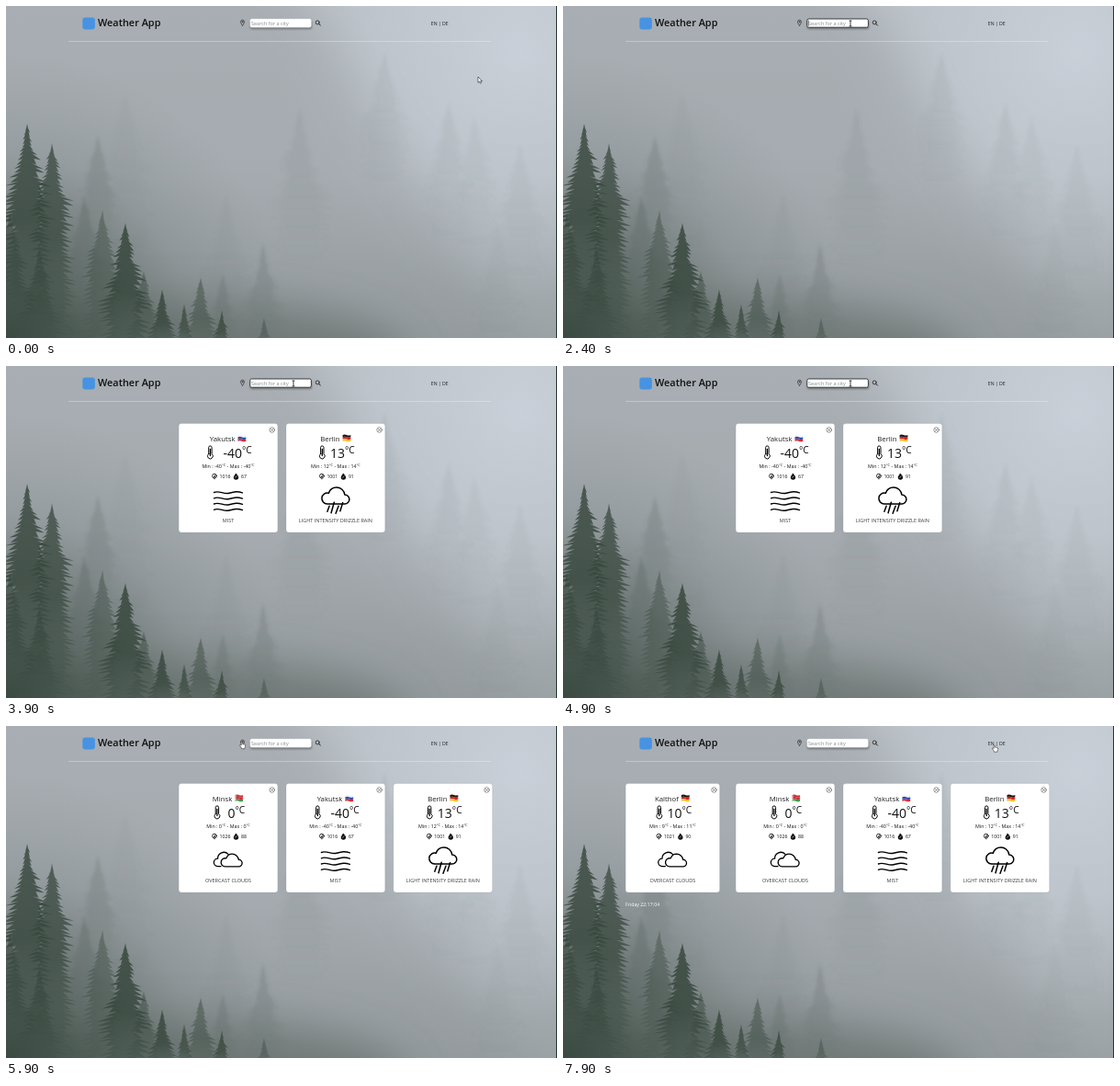
An HTML page for the animation above (8000 ms loop, 600 px wide and 361 px high).

```html
<!DOCTYPE html>
<html lang="en">
<head>
<meta charset="utf-8">
<title>Weather App</title>
<style>
  html, body { margin: 0; width: 100%; height: 100%; overflow: hidden; background: #a3a9ac; }
  svg { display: block; width: 600px; height: 361px; font-family: "Open Sans", "Noto Sans", sans-serif; }
  .line { fill: none; stroke: #000; stroke-linecap: round; stroke-linejoin: round; }
</style>
</head>
<body>
<svg id="stage" viewBox="0 0 600 361" xmlns="http://www.w3.org/2000/svg">
  <defs>
    <linearGradient id="sky" x2="0" y2="1">
      <stop offset="0" stop-color="#b9bfc5"/><stop offset=".5" stop-color="#b5bbc1"/>
      <stop offset="1" stop-color="#9ba2a5"/>
    </linearGradient>
    <radialGradient id="glow" gradientUnits="userSpaceOnUse" cx="560" cy="50" r="270">
      <stop offset="0" stop-color="#ccd3dc" stop-opacity=".85"/>
      <stop offset=".5" stop-color="#c6ced6" stop-opacity=".5"/>
      <stop offset="1" stop-color="#c4ccd4" stop-opacity="0"/>
    </radialGradient>
    <radialGradient id="dark" gradientUnits="userSpaceOnUse" cx="0" cy="361" r="310">
      <stop offset="0" stop-color="#33443a" stop-opacity=".92"/>
      <stop offset=".32" stop-color="#3b4b42" stop-opacity=".58"/>
      <stop offset=".65" stop-color="#56625d" stop-opacity=".2"/>
      <stop offset="1" stop-color="#6a7572" stop-opacity="0"/>
    </radialGradient>
    <linearGradient id="bark" x2="0" y2="1">
      <stop offset="0" stop-color="#34443a"/><stop offset=".5" stop-color="#37473d"/>
      <stop offset="1" stop-color="#42524a" stop-opacity=".3"/>
    </linearGradient>
    <linearGradient id="mistBark" x2="0" y2="1">
      <stop offset="0" stop-color="#5f6b68"/><stop offset=".4" stop-color="#5f6b68"/>
      <stop offset="1" stop-color="#5f6b68" stop-opacity="0"/>
    </linearGradient>
    <filter id="soft" x="-30%" y="-30%" width="160%" height="160%"><feGaussianBlur stdDeviation=".6"/></filter>
    <filter id="fog" x="-60%" y="-30%" width="220%" height="160%"><feGaussianBlur stdDeviation="1.8"/></filter>
    <filter id="haze" x="-30%" y="-60%" width="160%" height="220%"><feGaussianBlur stdDeviation="24"/></filter>
    <filter id="shade" x="-10%" y="-50%" width="120%" height="220%"><feGaussianBlur stdDeviation="1.3"/></filter>
  </defs>

  <rect width="600" height="361" fill="url(#sky)"/>
  <rect width="600" height="361" fill="url(#glow)"/>
  <path d="M260-80 350 20 400 120 470 220 580 420H-80V-80z" fill="#868b8e" opacity=".32" filter="url(#haze)"/>
  <ellipse cx="200" cy="390" rx="240" ry="70" fill="#4d5a53" opacity=".5" filter="url(#haze)"/>
  <rect width="600" height="361" fill="url(#dark)"/>
  <g id="far" filter="url(#fog)"></g>
  <g id="near" filter="url(#soft)"></g>
  <rect x="599" width="1" height="361" fill="#26352f"/>

  <rect x="83.3" y="12.4" width="13.6" height="13.2" rx="3" fill="#4793e2"/>
  <text x="100" y="22" font-size="10.9" font-weight="600" fill="#111">Weather App</text>
  <path d="M68 38.5H528" stroke="#fff" stroke-opacity=".38" stroke-width=".8"/>
  <g class="line" style="stroke:#333" stroke-width=".7">
    <path d="M257.5 21.2C256.2 19.4 255.5 18.2 255.5 17.2A2 2 0 0 1 259.5 17.2C259.5 18.2 258.8 19.4 257.5 21.2z"/>
    <circle cx="257.5" cy="17.2" r=".6"/>
    <circle cx="339.2" cy="17.9" r="2" style="stroke:#111"/><path d="M340.8 19.5 342.4 21.1" stroke-width="1" style="stroke:#111"/>
  </g>
  <rect x="266" y="16" width="67" height="9" rx="2" fill="#222" opacity=".45" filter="url(#shade)"/>
  <rect id="field" x="265.8" y="14" width="66.6" height="9.2" rx="1.8" fill="#fff"/>
  <text id="entry" x="267" y="20.6" font-size="5.5"></text>
  <path id="caret" d="M267.2 15.3V21.9" stroke="#111" stroke-width=".6"/>
  <text x="462.8" y="20.6" font-size="5.15" fill="#1c1f22">EN | DE</text>

  <g id="cards"></g>
  <text id="clock" x="68" y="196" font-size="5.25" fill="#fff"></text>

  <g id="arrow"><path d="M0 0V6.3L1.5 5 2.5 7.2 3.6 6.7 2.6 4.6H4.6z" fill="#fff" stroke="#111" stroke-width=".55" stroke-linejoin="round"/></g>
  <g id="beam"><path d="M-1.4-3H1.4M0-3V3M-1.4 3H1.4" fill="none" stroke="#000" stroke-width=".75"/></g>
  <g id="hand"><path d="M0 0C-.9 0-.9.8-.8 1.4V3.6L-1.7 3C-2.3 2.7-2.7 3.3-2.3 3.9L-.6 6.4V7.2H3V6.2C3.6 5.2 3.7 4.2 3.6 3C3.4 2.3 2.7 2.4 2.5 2.7C2.2 2.1 1.6 2.2 1.5 2.5C1.2 2 .8 2 .6 2.2V.7C.6.2.3 0 0 0z" fill="#fff" stroke="#111" stroke-width=".5"/></g>
</svg>
<script>
const $ = id => document.getElementById(id);
const LOOP = 8000;

// Seeded noise for the branches
let seed = 7;
const rnd = () => (seed = (seed * 16807) % 2147483647) / 2147483647;

// A spruce: drooping branches that reach full width some way below the top
function tree(x, top, h, w, alpha, fill) {
  const side = dir => {
    const pts = [];
    for (let y = 3; y < h; y += 3.5 + 2 * rnd()) {
      const reach = w / 2 * Math.min(1, y / (w * 1.5)) * (.65 + .55 * rnd());
      pts.push([x + dir * reach, top + y + 2], [x + dir * reach * .5, top + y + .5]);
    }
    return pts;
  };
  const pts = [[x, top], ...side(1), ...side(-1).reverse()];
  const d = pts.map(p => p.map(v => v.toFixed(1)).join(" ")).join("L");
  return `<path d="M${d}z" fill="${fill}" opacity="${alpha}"/>`;
}

const FAR = [
  [100, 140, 120, 46, .26], [320, 112, 170, 64, .09], [412, 50, 150, 50, .07],
  [482, 105, 150, 56, .08], [510, 120, 150, 50, .06], [560, 150, 150, 60, .06],
  [280, 258, 120, 52, .24], [236, 290, 90, 40, .3], [130, 95, 180, 60, .05],
  [240, 205, 150, 56, .06], [535, 235, 130, 60, .05], [85, 205, 150, 42, .4]
];
const NEAR = [
  [105, 222, 140, 42, .4], [212, 295, 90, 40, .45], [23, 128, 210, 54, .8],
  [50, 149, 200, 46, .72], [4, 225, 150, 64, .5], [36, 262, 120, 60, .45],
  [130, 236, 150, 54, .82], [170, 308, 70, 36, .8], [194, 324, 50, 30, .7],
  [235, 331, 44, 36, .75], [281, 339, 34, 22, .4], [150, 288, 90, 40, .45]
];
$("far").innerHTML = FAR.map(a => tree(...a, "url(#mistBark)")).join("");
$("near").innerHTML = NEAR.map(a => tree(...a, "url(#bark)")).join("");

// Card parts, drawn around x = 0
const CLOUD = "M8.5.5a4.5 4.5 0 0 1 4.47 4H13a2.5 2.5 0 0 1 0 5H3.5a3 3 0 1 1 .73-5.91A4.5 4.5 0 0 1 8.5.5z";
const wave = y => `M-15.5 ${y}C-10 ${y - 2.6}-5 ${y + 2.2} 1 ${y + .7}S10 ${y - 1.5} 15.5 ${y + .3}`;
const ICONS = {
  rain: `<g transform="translate(-16 131)scale(2)" class="line" stroke-width=".75"><path d="${CLOUD}"/>
    <path d="M4.6 10.6 3.5 13.6M7.2 8.6 5.6 14.4M9.6 10.6 8.1 14.6M11.9 8.8 10.5 13.4"/></g>`,
  mist: `<path class="line" stroke-width="1.4" d="${[137.5, 143.8, 150, 156.3].map(wave).join("")}"/>`,
  clouds: `<path class="line" stroke-width="1.3" d="M-8 152.6H-11.5A4.2 4.2 0 0 1-11.4 144.2A6.6 6.6 0 0 1 0 139.4"/>
    <path class="line" transform="translate(-8.6 138.4)scale(1.53)" stroke-width=".88" style="fill:#fff" d="${CLOUD}"/>`
};
const FLAGS = {
  de: ["#1b1414", "#d8202a", "#f5c026"],
  ru: ["#f3f3f3", "#2b50b8", "#d92c35"],
  by: ["#d0303a", "#d0303a", "#3f9a4a"]
};

function flag(kind, x) {
  const stripes = FLAGS[kind].map((c, i) => {
    const y = 75 + i * 2.2;
    return `<path d="M${x} ${y}q2.2-1 4.4 0t4.4 0v2.3q-2.2 1-4.4 0t-4.4 0z" fill="${c}"/>`;
  }).join("");
  return stripes + (kind === "by" ? `<path d="M${x + .6} 75v6.4" stroke="#fff" stroke-width=".9"/>` : "");
}

const text = (x, y, size, str, extra = "") =>
  `<text x="${x}" y="${y}" font-size="${size}" ${extra}>${str}</text>`;
const deg = `<tspan dy="-2.3" font-size="4">°C</tspan>`;

function cardArt(c, w) {
  const r = w / 2, ix = -c.tempEnd - 4.6;
  return `<rect x="${-r}" y="62.4" width="${w}" height="118.6" rx="3" fill="#fff" stroke="#8d9496" stroke-opacity=".5" stroke-width=".5"/>
    <g class="line" stroke-width=".55" style="stroke:#444"><circle cx="${r - 6.2}" cy="69.5" r="2.8"/>
      <path d="M${r - 7.3} 68.4l2.2 2.2m0-2.2l-2.2 2.2"/></g>
    ${text(c.nameEnd, 81.8, 7.8, c.name, 'text-anchor="end" fill="#222"')}${flag(c.flag, c.nameEnd + 3)}
    <g class="line" stroke-width="1"><path d="M${ix - 1.7} 95.6V88.6a1.7 1.7 0 0 1 3.4 0V95.6a2.9 2.9 0 1 1-3.4 0z"/>
      <path d="M${ix} 90.5V97.5" stroke-width="1.3"/></g>
    ${text(c.tempEnd, 99.7, 14, c.temp, 'text-anchor="end" font-weight="500" fill="#111"')}
    ${text(c.tempEnd, 94.6, 10.2, "°C", 'font-weight="500" fill="#111"')}
    <text y="110.8" font-size="5.35" font-weight="500" text-anchor="middle" fill="#111">Min : ${c.min}${deg}<tspan dy="2.3"> - Max : ${c.max}</tspan>${deg}</text>
    <g class="line" stroke-width=".8"><circle cx="-15" cy="119.6" r="2.4"/><path d="M-15 122.2v.7M-15 119.8l.9-1.3M-15.7 120.4h1.4"/></g>
    <path d="M8.1 116.4C9.4 118 11.2 119 11.2 121A2.7 2.7 0 0 1 5.8 121C5.8 119.4 7.6 118.4 8.1 116.4z" fill="#111"/>
    <path d="M7.4 121.6l2-2" stroke="#fff" stroke-width=".6"/>
    ${text(-9.5, 121.7, 5.2, c.press, 'font-weight="500" fill="#111"')}
    ${text(14, 121.7, 5.2, c.humid, 'font-weight="500" fill="#111"')}
    ${ICONS[c.icon]}
    ${text(0, 170.2, 5.5, c.sky, 'text-anchor="middle" fill="#383838"')}`;
}

// at: the moment a card joins; typed: first and last moment of typing
const CITIES = [
  { name: "Berlin", flag: "de", nameEnd: 4.7, temp: "13", tempEnd: 10, min: 12, max: 14, press: 1001, humid: 91,
    icon: "rain", sky: "LIGHT INTENSITY DRIZZLE RAIN", at: 2800, typed: [2500, 2600] },
  { name: "Yakutsk", flag: "ru", nameEnd: 7.5, temp: "-40", tempEnd: 15, min: -40, max: -40, press: 1016, humid: 67,
    icon: "mist", sky: "MIST", at: 3600, typed: [2900, 3400] },
  { name: "Minsk", flag: "by", nameEnd: 4.3, temp: "0", tempEnd: 7.5, min: 0, max: 0, press: 1026, humid: 88,
    icon: "clouds", sky: "OVERCAST CLOUDS", at: 5000, typed: [4300, 4700] },
  { name: "Kalthof", flag: "de", nameEnd: 6.5, temp: "10", tempEnd: 10, min: 9, max: 11, press: 1021, humid: 90,
    icon: "clouds", sky: "OVERCAST CLOUDS", at: 6200, local: true }
];
for (const c of CITIES) {
  c.node = document.createElementNS("http://www.w3.org/2000/svg", "g");
  c.node.innerHTML = cardArt(c, c.local ? 102.5 : 107.8);
  $("cards").append(c.node);
}

// Pointer stops: time, x, y
const PATH = [
  [0, 514, 77], [500, 514, 77], [1600, 313, 19], [5000, 313, 19], [5500, 267.3, 19.5],
  [5700, 257, 17.5], [6200, 257, 17.5], [6800, 85.5, 200], [6900, 85.5, 200],
  [7400, 510, 40], [7500, 500, 22], [7800, 470, 21], [8000, 470, 21]
];
function pointer(t) {
  const i = PATH.findIndex(p => p[0] > t);
  const [t0, x0, y0] = PATH[i - 1], [t1, x1, y1] = PATH[i];
  const k = (t - t0) / (t1 - t0), e = k * k * (3 - 2 * k);
  return [x0 + (x1 - x0) * e, y0 + (y1 - y0) * e];
}

const show = (node, on) => node.setAttribute("visibility", on ? "visible" : "hidden");

function typedText(t) {
  const c = CITIES.find(c => c.typed && t >= c.typed[0] && t < c.at - 100);
  if (!c) return "";
  const [a, b] = c.typed, k = Math.min(1, (t - a + 100) / (b - a + 100));
  return c.name.slice(0, Math.ceil(c.name.length * k));
}

function draw(now) {
  const t = Math.floor((now % LOOP) / 100) * 100;

  const focus = t >= 1700 && t < 5800, word = typedText(t);
  $("field").setAttribute("stroke", focus ? "#2a2d31" : "#d5d8da");
  $("field").setAttribute("stroke-width", focus ? .9 : .4);
  $("entry").textContent = word || "Search for a city";
  $("entry").setAttribute("fill", word ? "#222" : "#858a8e");
  const end = word ? $("entry").getComputedTextLength() : 0;
  $("caret").setAttribute("transform", `translate(${end} 0)`);
  show($("caret"), focus && (word || Math.floor(t / 265) % 2));

  let newer = 0;
  for (let i = CITIES.length - 1; i >= 0; i--) {
    const c = CITIES[i], on = t >= c.at;
    show(c.node, on);
    if (!on) continue;
    const x = c.local ? 119.4 : 242 + 116.9 * newer++;
    c.node.setAttribute("transform", `translate(${x} 0)`);
  }

  show($("clock"), t >= 6200);
  $("clock").textContent = "Friday 22:17:0" + Math.max(1, 2 + Math.floor((t - 6600) / 500));

  const [x, y] = pointer(t);
  const inField = x > 265 && x < 333 && y > 13 && y < 24;
  const onLink = y < 24 && ((x > 254 && x < 261) || (x > 462 && x < 482));
  show($("beam"), inField);
  show($("hand"), onLink);
  show($("arrow"), !inField && !onLink);
  for (const id of ["beam", "hand", "arrow"]) $(id).setAttribute("transform", `translate(${x} ${y})`);
}

const start = performance.now();
function tick() {
  draw(performance.now() - start);
  requestAnimationFrame(tick);
}
tick();
</script>
</body>
</html>
```
